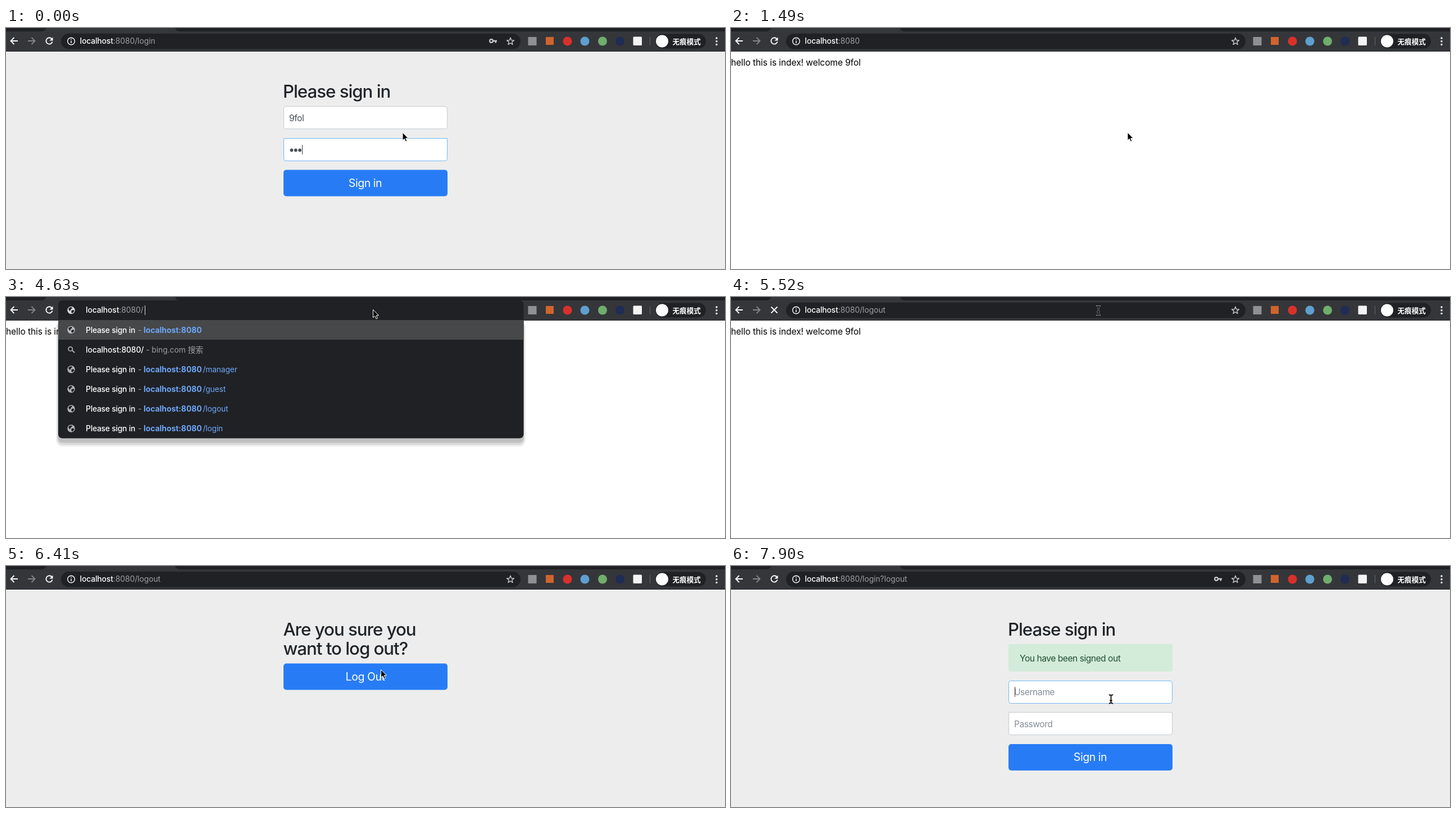
Recreate the animation shown at these times as an HTML page. Size 1280x429 px, loop 8 s.

```html
<!DOCTYPE html>
<html lang="en">
<head>
<meta charset="utf-8">
<title>Sign in and out</title>
<style>
html, body { margin: 0; width: 100%; height: 100%; overflow: hidden; background: #fff; }
svg { display: block; width: 1280px; height: 429px; }
text { font: 400 15.6px Inter, "Noto Sans CJK SC", "Noto Sans CJK", sans-serif; font-optical-sizing: none; white-space: pre; }
.bar text { font-size: 13.85px; letter-spacing: -.04px; fill: #9aa0a6; }
.bar .host { fill: #fff; font-weight: 500; letter-spacing: -.1px; }
.bar .title { fill: #fff; font-weight: 500; letter-spacing: -.22px; }
.bar .link { fill: #6ea6f8; font-weight: 700; letter-spacing: 0; }
.bar .path { fill: #6ea6f8; letter-spacing: -.18px; }
.bar .mode { font: 700 12.6px "Noto Sans CJK SC", "Noto Sans CJK", sans-serif; fill: #fff; letter-spacing: 0; }
.line { fill: none; stroke: #fff; stroke-width: 1.8; }
.form text { letter-spacing: -.48px; fill: #495057; }
.form .head { font-size: 31.2px; font-weight: 500; letter-spacing: -1px; fill: #212529; }
.form .label { font-size: 19.5px; letter-spacing: -.45px; fill: #fff; text-anchor: middle; }
.form .hint { fill: #868e96; }
.field { fill: #fff; stroke: #c6cbd0; }
.focus { stroke: #74b6f5; }
.caret { stroke: #343a40; }
.button { fill: #277cf6; }
</style>
</head>
<body>
<svg viewBox="0 0 1280 429">
  <defs>
    <path id="box" d="M498.5 .5h283a4 4 0 0 1 4 4v32a4 4 0 0 1-4 4h-283a4 4 0 0 1-4-4v-32a4 4 0 0 1 4-4z"/>
    <path id="flat" d="M494.5 .5h291v36a4 4 0 0 1-4 4h-283a4 4 0 0 1-4-4z"/>
    <rect id="button" class="button" x="494" width="292" height="47" rx="5"/>
    <g id="globe">
      <circle r="6.7" fill="#dadce0"/>
      <path d="M-5-2.6Q-2-6.4 1-5.2L2.2-3.2-.2-2.4-.5-.2-2.4.3-2.6 2.6zM.6.6 3.4-.6 5.4.8Q5 4 1.6 5.4L.2 3.4z" fill="#202124"/>
    </g>
  </defs>

  <rect width="1280" height="429" fill="#fff"/>

  <g class="form" data-on="0-1340">
    <rect y="41" width="1280" height="388" fill="#ededed"/>
    <text class="head" x="493" y="124">Please sign in</text>
    <use href="#box" class="field" y="139"/>
    <text x="504" y="166">9fol</text>
    <use href="#flat" class="field focus" y="196"/>
    <g id="secret"></g>
    <use href="#button" y="252.5"/>
    <text class="label" x="639.5" y="283">Sign in</text>
  </g>

  <g data-on="1340-5670">
    <text x="0" y="66.5" letter-spacing="-.1" fill="#000">hello this is index! welcome 9fol</text>
  </g>

  <g class="form" data-on="5670-6860">
    <rect y="41" width="1280" height="388" fill="#ededed"/>
    <text class="head" x="493.5" y="124">Are you sure you</text>
    <text class="head" x="493.5" y="158">want to log out?</text>
    <use href="#button" y="173.5"/>
    <text class="label" x="639.5" y="204">Log Out</text>
  </g>

  <g class="form" data-on="6860-8000">
    <rect y="41" width="1280" height="388" fill="#ededed"/>
    <text class="head" x="493" y="124">Please sign in</text>
    <rect x="494" y="139" width="292" height="49" rx="4" fill="#d3ebd9"/>
    <text x="514" y="169.5" style="fill:#1f5030">You have been signed out</text>
    <use href="#box" class="field focus" y="204"/>
    <text class="hint" x="504" y="230">Username</text>
    <path class="caret" d="M505.5 215v18" data-on="6860-7300 7900-8000"/>
    <use href="#flat" class="field" y="260"/>
    <text class="hint" x="504" y="286.5">Password</text>
    <use href="#button" y="317"/>
    <text class="label" x="639.5" y="347">Sign in</text>
  </g>

  <g class="bar">
    <rect width="1280" height="42" fill="#35363a"/>
    <path d="M0 0H72Q69 6 62 6H0zM301 0H1280V6H310Q303 6 301 0z" fill="#202124"/>
    <rect y="41" width="1280" height="1" fill="#28292c"/>

    <path class="line" d="M21 23H9M14.5 17 8.5 23l6 6"/>
    <path class="line" d="M39 23h12M45.500 17l6 6-6 6" style="stroke:#85868a"/>
    <g data-on="0-1200 1490-5520 5820-6710 7010-8000">
      <path class="line" d="M81.400 19.200a5.700 5.700 0 1 0 1.200 5.300"/>
      <path d="M83.500 16.500v6h-6z" fill="#fff"/>
    </g>
    <path class="line" d="M71.500 17.500l11 11m0-11-11 11" data-on="1200-1490 5520-5820 6710-7010"/>

    <rect x="98" y="10" width="818" height="27.500" rx="13.700" fill="#202124"/>
    <rect x="98" y="10" width="818" height="27.500" rx="13.700" class="line" style="stroke:#50709c" data-on="3580-5520"/>
    <circle class="line" cx="116" cy="23.500" r="6.300" style="stroke-width:1.400"/>
    <path class="line" d="M116 22.500v4.500M116 19.500v1.600" style="stroke-width:1.500"/>
    <rect x="131.500" y="15" width="97.500" height="17" fill="#2a63b6" data-on="3580-4180"/>
    <text x="131.500" y="28" data-on="3580-4180" style="fill:#dce8fb">localhost:8080</text>
    <g id="urls"></g>

    <g data-on="0-1340 6860-8000">
      <circle cx="864" cy="23" r="2.900" fill="none" stroke="#c6c8cb" stroke-width="2.200"/>
      <path d="M867 23h7M871.700 23v3.500" fill="none" stroke="#c6c8cb" stroke-width="2.400"/>
    </g>
    <path id="star" fill="none" stroke="#c6c8cb" stroke-width="1.400" stroke-linejoin="round"/>

    <rect x="929.500" y="16" width="15" height="15" fill="#8f9093"/>
    <rect x="961" y="16" width="14" height="14" fill="#d0642c"/>
    <circle cx="999.500" cy="23.500" r="8" fill="#d9302c"/>
    <circle cx="1030.500" cy="23.500" r="8" fill="#5f9fd0"/>
    <circle cx="1062" cy="23.500" r="8" fill="#6fae6c"/>
    <circle cx="1093" cy="23.500" r="8" fill="#1f2c54"/>
    <rect x="1116.500" y="15.500" width="15.500" height="15.500" rx="1.500" fill="#f4f4f4"/>
    <path d="M1146.500 16v15" stroke="#65666a"/>
    <rect x="1156" y="10.500" width="90" height="26" rx="13" fill="#202124"/>
    <circle cx="1168" cy="23.500" r="11" fill="#fff"/>
    <text class="mode" x="1186.500" y="28.500">无痕模式</text>
    <path d="M1265 18h0m0 5.700h0m0 5.700h0" stroke="#fff" stroke-width="3.400" stroke-linecap="round"/>
    <g id="lists"></g>
  </g>

  <path id="arrow" d="M0 0V14.200L3.300 11.200 5.600 16.300 7.900 15.300 5.700 10.300H10z" fill="#000" stroke="#fff"/>
  <g id="beam" fill="none">
    <path d="M-4-8Q0-8 0-5.500Q0-8 4-8M0-6V6M-4 8Q0 8 0 5.500Q0 8 4 8M-2.500 2.500h5" stroke="#aaa" stroke-width="2.600"/>
    <path d="M-3.500-7.500Q0-7.500 0-5.500Q0-7.500 3.500-7.500M0-6V6M-3.500 7.500Q0 7.500 0 5.500Q0 7.500 3.500 7.500M-2 2.500h4" stroke="#000" stroke-width="1.300"/>
  </g>
</svg>
<script>
const LOOP = 8000;
const $ = id => document.getElementById(id);
const host = (x, rest) => `<text x="${x}" y="28"><tspan class="host">localhost</tspan>${rest}</text>`;

// Password dots, each with the caret that follows it
const typed = [0, 0, 0, 300, 600, 900, 1340];
$('secret').innerHTML = typed.slice(0, -1).map((at, i) => {
  const x = 508.5 + 7.3 * i;
  return `<circle cx="${x}" cy="217.500" r="2.900" fill="#495057" data-on="${at}-1340"/>
    <path class="caret" d="M${Math.round(x + 4) + .5} 208v17" data-on="${at}-${Math.min(typed[i + 1], 1200)}"/>`;
}).join('');

const urls = [
  ['0-1340', ':8080/login'],
  ['1340-3580 4180-4480', ':8080'],
  ['5520-6860', ':8080/logout'],
  ['6860-8000', ':8080/login?logout'],
];
$('urls').innerHTML = urls.map(([on, rest]) => `<g data-on="${on}">${host(131.5, rest)}</g>`).join('');

const star = Array.from({ length: 10 }, (_, i) => {
  const r = i % 2 ? 2.9 : 6.8, a = i * Math.PI / 5;
  return [898 + r * Math.sin(a), 24 - r * Math.cos(a)].map(v => v.toFixed(1));
});
$('star').setAttribute('d', `M${star.join('L')}z`);

function row(path, i, query) {
  const y = 58.5 + 35.1 * i;
  if (path === 'search') return `
    <path d="M118 ${y + 1.5}l4 4" stroke="#bdc1c6" stroke-width="1.700"/>
    <circle cx="114.700" cy="${y - 1.2}" r="3.700" fill="none" stroke="#bdc1c6" stroke-width="1.500"/>
    <text x="142" y="${y + 5}"><tspan class="host">localhost:8080/${query}</tspan> - bing.com 搜索</text>`;
  return `<use href="#globe" x="116" y="${y}" opacity=".8"/>
    <text x="142" y="${y + 5}"><tspan class="title">Please sign in</tspan><tspan x="235">-</tspan>
    <tspan class="link" x="245">localhost:8080</tspan><tspan class="path" x="350.500">${path}</tspan></text>`;
}

function list(on, query, rest, paths) {
  const h = 35 + 35.1 * paths.length;
  const end = 246.5 + query.length * 5.8;
  const shade = (d, drop, o) =>
    `<rect x="${93 - d}" y="42" width="${828 + 2 * d}" height="${h - 36 + drop}" rx="${8 + d}" opacity="${o}"/>`;
  return `<g data-on="${on}">
    ${shade(4, 15, .06)}${shade(2, 12, .09)}${shade(1, 8, .12)}
    <rect x="93" y="6" width="828.500" height="${h}" rx="7" fill="#202124"/>
    <rect x="93" y="41" width="828.500" height="35" fill="#474849"/>
    <use href="#globe" x="116" y="23.500"/>
    ${rest ? `<rect x="${end}" y="15" width="${rest.length * 8}" height="17" fill="#2a63b6"/>` : ''}
    ${host(142, ':8080/' + query + rest)}
    <path d="M${Math.round(end) + .5} 15v17" stroke="#dadce0"/>
    ${paths.map((p, i) => row(p, i, query)).join('')}
  </g>`;
}
$('lists').innerHTML =
  list('4480-4920', '', '', ['', 'search', '/manager', '/guest', '/logout', '/login']) +
  list('4920-5070', 'l', 'ogout', ['/logout', 'search', '/login']) +
  list('5070-5520', 'lo', 'gout', ['/logout', 'search', '/login']);

// time, shape, x, y
const moves = [
  [0, 'arrow', 706, 186], [2690, 'arrow', 697, 178], [2840, 'arrow', 660, 145],
  [2990, 'arrow', 612, 102], [3130, 'arrow', 628, 52], [3280, 'beam', 651, 25],
  [3430, 'beam', 654, 24], [4630, 'arrow', 653.5, 22.5], [5520, 'beam', 654, 24],
  [5820, 'beam', 650, 27], [5970, 'arrow', 645, 52], [6110, 'arrow', 652, 105],
  [6260, 'arrow', 664, 160], [6410, 'arrow', 667.5, 184.5], [6560, 'arrow', 666, 187],
  [7010, 'arrow', 667, 193], [7300, 'beam', 672, 215], [7450, 'beam', 675, 230],
  [7600, 'beam', 676.5, 237],
];

const parts = [...document.querySelectorAll('[data-on]')].map(el =>
  [el, el.dataset.on.split(' ').map(span => span.split('-').map(Number))]);

function draw(t) {
  for (const [el, spans] of parts)
    el.style.display = spans.some(([a, b]) => t >= a && t < b) ? '' : 'none';
  const [, shape, x, y] = moves.findLast(m => m[0] <= t);
  for (const id of ['arrow', 'beam']) $(id).style.display = id === shape ? '' : 'none';
  $(shape).setAttribute('transform', `translate(${x} ${y})`);
}

const start = performance.now();
function tick() {
  draw((performance.now() - start) % LOOP);
  requestAnimationFrame(tick);
}
tick();
</script>
</body>
</html>
```
